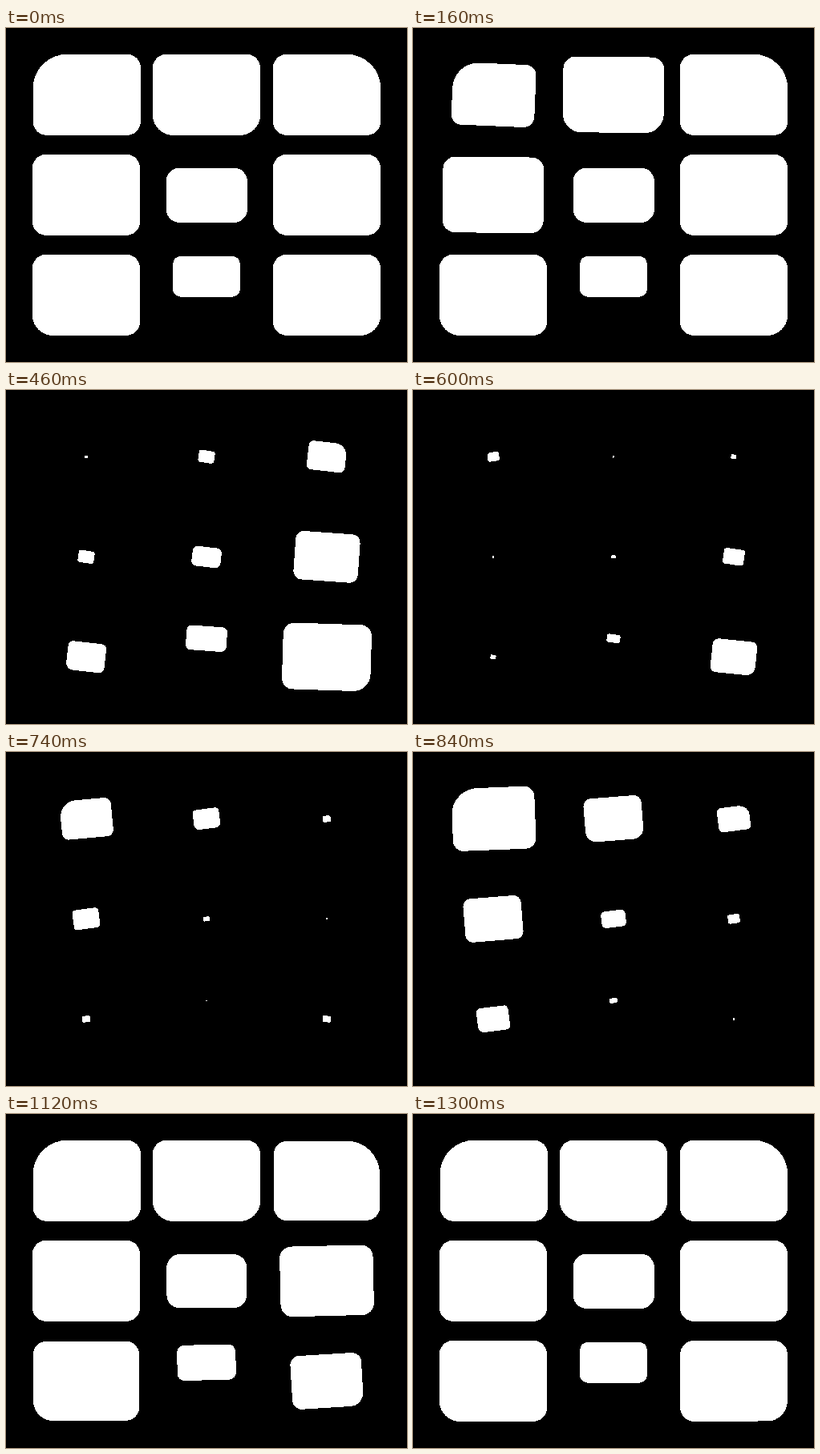
Recreate the animation shown at these times as an HTML page with a canvas. Size 500 by 417 pixels, loop 1.32 s.

```html
<!DOCTYPE html>
<html lang="en">
<head>
<meta charset="utf-8">
<title>Tile wave</title>
<style>
  html, body { margin: 0; width: 100%; height: 100%; overflow: hidden; background: #000; }
  canvas { display: block; }
</style>
</head>
<body>
<canvas id="stage" width="500" height="417"></canvas>
<script>
const LOOP = 1320, STEP = 20, HALF = 500, LAG = 80;
const TILT = 10 * Math.PI / 180, MIN_SCALE = 0.01;
const U = 25 / 3, R = 2 * U, MID = 3 * U, BIG = 5 * U;
const canvas = document.getElementById('stage');
const ctx = canvas.getContext('2d', { willReadFrequently: true });

// Tile on a 3 x 3 grid; radii run clockwise from the top left.
function tile(col, row, radii = R, { w = 16 * U, h = 12 * U, dx = 0, dy = 0 } = {}) {
  return { x: 100 + col * 150, y: 250 / 3 + row * 125, w, h, dx, dy, radii, delay: (col + row) * LAG };
}

const tiles = [
  tile(0, 0, [BIG, R, R, R], { dx: 0.8 }),
  tile(1, 0, [R, R, MID, MID]),
  tile(2, 0, [R, BIG, R, R]),
  tile(0, 1),
  tile(1, 1, R, { w: 100.5, h: 67.5, dx: 0.25, dy: 0.42 }),
  tile(2, 1),
  tile(0, 2, [R, R, R, MID]),
  { ...tile(1, 2, 10, { w: 10 * U, h: 6 * U }), y: 310.3 },
  tile(2, 2, [R, R, MID, R])
];

function drawTile(p, time) {
  const t = Math.min(Math.max(time - p.delay, 0), 2 * HALF);
  const open = (1 + Math.cos(Math.PI * t / HALF)) / 2;
  const scale = MIN_SCALE + (1 - MIN_SCALE) * open;
  ctx.save();
  ctx.translate(p.x, p.y);
  ctx.rotate((t < HALF ? 1 : -1) * TILT * (1 - open));
  ctx.scale(scale, scale);
  ctx.beginPath();
  ctx.roundRect(p.dx - p.w / 2, p.dy - p.h / 2, p.w, p.h, p.radii);
  ctx.fill();
  ctx.restore();
}

// Every touched pixel turns solid, which gives hard edges.
function harden() {
  const img = ctx.getImageData(0, 0, canvas.width, canvas.height);
  const px = new Uint32Array(img.data.buffer);
  for (let i = 0; i < px.length; i++) {
    px[i] = img.data[i * 4 + 3] > 8 ? 0xffffffff : 0;
  }
  ctx.putImageData(img, 0, 0);
}

function draw(time) {
  ctx.clearRect(0, 0, canvas.width, canvas.height);
  ctx.fillStyle = '#fff';
  for (const p of tiles) drawTile(p, time);
  harden();
}

const start = performance.now();
let last = -1;
function tick() {
  const elapsed = Math.max(0, performance.now() - start) % LOOP;
  const time = Math.floor(elapsed / STEP) * STEP;
  if (time !== last) draw(last = time);
  requestAnimationFrame(tick);
}
tick();
</script>
</body>
</html>
```
